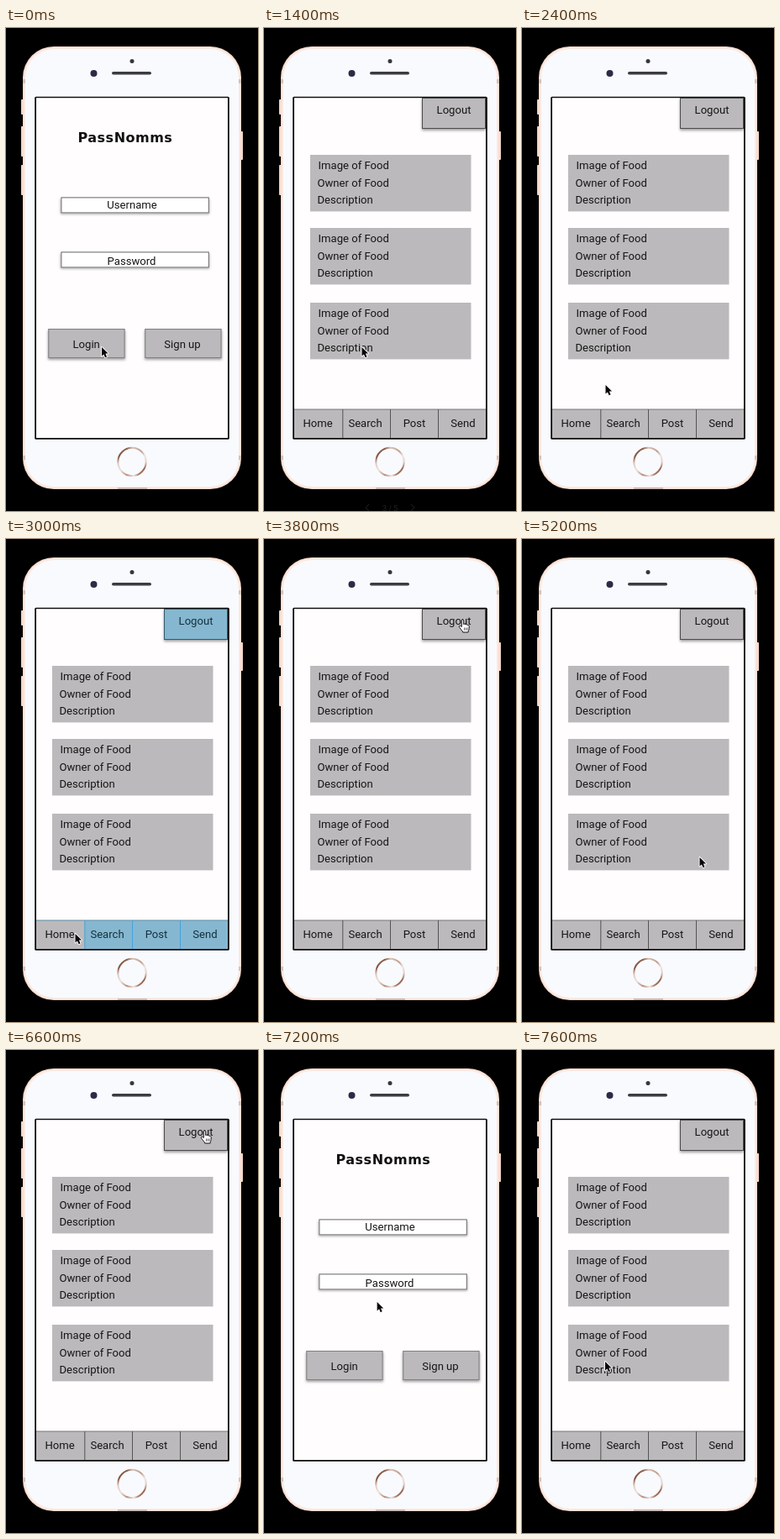
Animation of 300x575 px, one loop 8000 ms. Source, as an HTML page with a canvas:

```html
<!DOCTYPE html>
<html lang="en">
<head>
<meta charset="utf-8">
<title>App prototype</title>
<style>
html, body { margin: 0; width: 100%; height: 100%; overflow: hidden; background: #000; }
canvas { display: block; width: 300px; height: 575px; }
</style>
</head>
<body>
<canvas id="stage"></canvas>
<script>
const LOOP = 8000, STEP = 200;
const GREY = '#bbb9bb', BLUE = '#86b7d0', INK = '#161616', PAPER = '#fffdfe';
const canvas = document.getElementById('stage');
const ctx = canvas.getContext('2d');
const ratio = window.devicePixelRatio || 1;
canvas.width = 300 * ratio;
canvas.height = 575 * ratio;

// Pointer moves: start, end, target x, target y
const START = [114, 380];
const MOVES = [
  [0, 600, 116.5, 380],
  [2000, 2800, 82.5, 470],
  [3200, 3800, 236.5, 97],
  [4200, 5000, 211.5, 379],
  [5600, 6600, 236.5, 97],
  [6800, 7400, 99, 371]
];
// Page switches: time, page
const PAGES = [[0, 'login'], [1000, 'home'], [4000, 'login'], [5200, 'home'], [6800, 'login'], [7600, 'home']];
const HOTSPOTS = {
  login: [[51, 358, 90, 35], [166, 358, 90, 35]],
  home: [[188, 83, 76, 37], [94, 454, 170, 34]]
};

const clamp = v => Math.max(0, Math.min(1, v));
const ease = p => p * p * (3 - 2 * p);
const pageAt = t => PAGES.filter(p => t >= p[0]).pop()[1];

function pointerAt(t) {
  let [x, y] = START;
  for (const [a, b, tx, ty] of MOVES) {
    const p = ease(clamp((t - a) / (b - a)));
    x += (tx - x) * p;
    y += (ty - y) * p;
  }
  return [x, y];
}

function box(x, y, w, h, fill) {
  ctx.fillStyle = fill;
  ctx.fillRect(x, y, w, h);
}

function pill(x, y, w, h, r, fill) {
  ctx.fillStyle = fill;
  ctx.beginPath();
  ctx.roundRect(x, y, w, h, r);
  ctx.fill();
}

function dot(x, y, r, fill) {
  ctx.fillStyle = fill;
  ctx.beginPath();
  ctx.arc(x, y, r, 0, Math.PI * 2);
  ctx.fill();
}

function label(str, x, y, align = 'center', color = INK) {
  ctx.font = '13.1px Roboto, Arial, sans-serif';
  ctx.textAlign = align;
  ctx.fillStyle = color;
  ctx.fillText(str, x, y);
}

// Outlined box with a soft shadow below
function raised(x, y, w, h, fill, line) {
  ctx.save();
  ctx.shadowColor = 'rgba(0,0,0,0.38)';
  ctx.shadowBlur = 3 * ratio;
  ctx.shadowOffsetY = 2 * ratio;
  box(x, y, w, h, fill);
  ctx.restore();
  ctx.strokeStyle = line;
  ctx.lineWidth = 1;
  ctx.strokeRect(x + 0.5, y + 0.5, w - 1, h - 1);
}

function drawPhone() {
  const rose = '#f6dacd';
  for (const [y, h] of [[85, 18], [117, 36], [163, 36]]) pill(18, y, 4, h, 1, rose);
  pill(278, 123, 4, 34, 1, rose);
  pill(20, 22, 260, 527, 37, '#f9dccf');
  pill(21.2, 23.2, 257.6, 524.6, 36, '#fdebe3');
  for (const y of [61, 509]) {
    box(20, y, 3, 5, '#d8c3b9');
    box(277, y, 3, 5, '#d8c3b9');
  }
  box(133, 547, 35, 2, '#c9b9b2');
  pill(23, 25, 254, 521, 34.5, '#f8fafe');
  dot(150, 39.5, 2.5, '#35353b');
  dot(104.5, 54, 4, '#2b2b46');
  pill(126, 52, 47, 3.5, 1.75, '#3b3b40');

  const ring = ctx.createConicGradient(0, 150, 516.5);
  [[0, '#e6d0c6'], [0.08, '#96634e'], [0.17, '#a87663'], [0.23, '#f1e6e0'], [0.31, '#b98d7b'],
   [0.4, '#efe2db'], [0.48, '#e3cabf'], [0.56, '#85553f'], [0.69, '#8f5f4b'], [0.76, '#dcc2b6'],
   [0.86, '#c09a8a'], [0.93, '#f0e4de'], [1, '#e6d0c6']]
    .forEach(([at, c]) => ring.addColorStop(at, c));
  ctx.strokeStyle = ring;
  ctx.lineWidth = 2;
  ctx.beginPath();
  ctx.arc(150, 516.5, 16.7, 0, Math.PI * 2);
  ctx.stroke();

  pill(34.2, 81.7, 231.6, 408, 1.5, '#0b0b0b');
  box(36, 83.2, 228, 404.8, PAPER);
}

function drawTitle() {
  ctx.font = 'bold 16px "DejaVu Sans", Verdana, sans-serif';
  ctx.textAlign = 'left';
  ctx.letterSpacing = '0.5px';
  ctx.fillStyle = '#111';
  ctx.fillText('PassNomms', 85.5, 136);
  ctx.letterSpacing = '0px';
}

function drawLogin() {
  drawTitle();
  raised(65.4, 201.4, 176.4, 19, '#fff', '#666');
  raised(65.4, 266.4, 176.4, 19, '#fff', '#666');
  label('Username', 150, 215);
  label('Password', 149.5, 281.5);
  raised(50.3, 358, 91.2, 35, GREY, '#808080');
  raised(165.3, 358, 91.2, 35, GREY, '#808080');
  label('Login', 95.7, 381);
  label('Sign up', 210, 381);
}

function drawHome(hint) {
  const tint = hint ? BLUE : GREY;
  const ink = hint ? '#14303d' : INK;
  raised(188, 83, 76, 37, tint, hint ? '#35586a' : '#4c4c4c');
  label('Logout', 226, 102, 'center', ink);

  for (const y of [151, 238, 327]) {
    box(55, y, 191.5, 67.4, GREY);
    ['Image of Food', 'Owner of Food', 'Description'].forEach((s, i) =>
      label(s, i ? 63.5 : 64.5, y + 17.4 + i * 20.3, 'left'));
  }

  box(36, 454, 228, 34, tint);
  if (hint) box(36, 454, 58, 34, GREY);
  box(36, 453.5, 228, 1, hint ? '#5d8ba3' : '#777');
  for (const x of [93.3, 150, 207]) box(x, 454, 1, 34, hint ? '#42a2db' : '#555');
  [['Home', 64], ['Search', 120.5], ['Post', 179], ['Send', 237]].forEach(([s, x], i) =>
    label(s, x, 475, 'center', i ? ink : INK));
}

// Dim page counter under the phone
function drawFooter(t, page) {
  const a = t < 1000 ? clamp(t / 600) : clamp((2000 - t) / 1000);
  if (!a) return;
  ctx.globalAlpha = a;
  ctx.font = '9px Inter, sans-serif';
  ctx.textAlign = 'center';
  ctx.fillStyle = ctx.strokeStyle = '#363636';
  ctx.lineWidth = 1;
  ctx.fillText((page === 'home' ? 3 : 2) + ' / 5', 150, 574.5);
  for (const [x, d] of [[125, -1], [175, 1]]) {
    ctx.beginPath();
    ctx.moveTo(x, 567);
    ctx.lineTo(x + 4 * d, 571);
    ctx.lineTo(x, 575);
    ctx.stroke();
  }
  ctx.globalAlpha = 1;
}

const ARROW = new Path2D('M0 0V10.6L2.4 8.4L4.1 12.2L6 11.4L4.4 7.6H7.6Z');
const HAND = new Path2D('M-1.2 0C-1.2-1.4 1.2-1.4 1.2 0V4.6C1.6 3.8 3.4 4 3.5 5C4 4.3 5.5 4.6 5.6 5.6' +
  'C6.4 5 7.7 5.5 7.7 6.6V9.5C7.7 11 6.6 12 6.6 14H0.2C0 12-3.6 9.4-4.2 7.4C-4.4 6-2.6 5.8-1.2 7.6Z');

function drawPointer(x, y, hand) {
  ctx.save();
  ctx.translate(x, y);
  ctx.lineJoin = 'round';
  if (hand) {
    ctx.fillStyle = '#fff';
    ctx.strokeStyle = '#111';
    ctx.lineWidth = 1;
    ctx.fill(HAND);
    ctx.stroke(HAND);
    for (const fx of [1.5, 3.4, 5.3]) box(fx, 8.5, 0.7, 3.2, '#222');
  } else {
    ctx.strokeStyle = '#fff';
    ctx.lineWidth = 1.8;
    ctx.stroke(ARROW);
    ctx.fillStyle = '#080808';
    ctx.fill(ARROW);
  }
  ctx.restore();
}

function draw(t) {
  ctx.setTransform(ratio, 0, 0, ratio, 0, 0);
  box(0, 0, 300, 575, '#000');
  const page = pageAt(t);
  const [x, y] = pointerAt(t);
  drawPhone();
  if (page === 'home') drawHome(t >= 2800 && t < 3200);
  else drawLogin();
  drawFooter(t, page);
  const over = HOTSPOTS[page].some(([hx, hy, w, h]) => x >= hx && x <= hx + w && y >= hy && y <= hy + h);
  drawPointer(x, y, over && t >= STEP);
}

const begin = performance.now();
function tick() {
  const t = (performance.now() - begin) % LOOP;
  draw(Math.floor(t / STEP) * STEP);
  requestAnimationFrame(tick);
}
tick();
</script>
</body>
</html>
```
